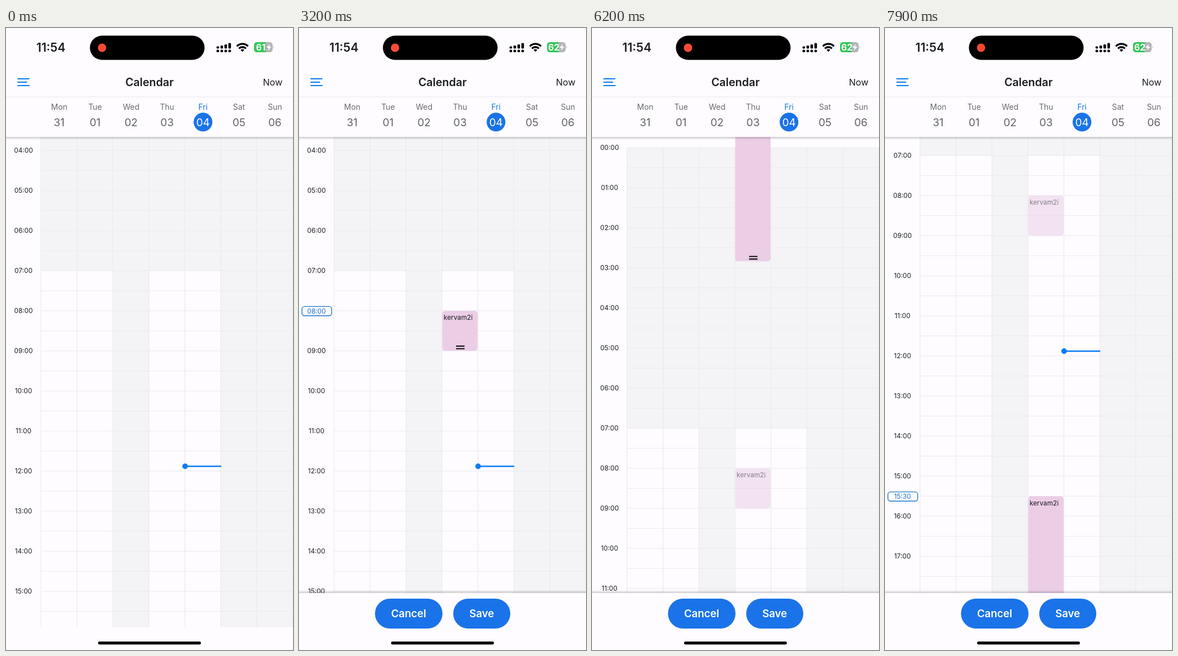
An HTML page that plays this animation: 508x1102 px, repeating every 8000 ms.

```html
<!DOCTYPE html>
<html lang="en">
<head>
<meta charset="utf-8">
<title>Calendar</title>
<style>
html, body { margin: 0; width: 100%; height: 100%; overflow: hidden; background: #fefcff; }
svg { display: block; width: 508px; height: 1102px; font-family: Inter, sans-serif; }
text { text-anchor: middle; fill: #1b1b1e; }
.bg { fill: #fefcff; }
.off { fill: #f4f3f6; }
.grid { stroke: #ebeaee; stroke-width: 1.2; }
.small { font-size: 11.8px; }
.event text { text-anchor: start; }
.event rect { fill: #ebcde6; }
.button rect { fill: #1a73e8; }
.button text { fill: #fff; font-size: 18.5px; font-weight: 600; }
</style>
</head>
<body>
<svg viewBox="0 0 508 1102">
  <defs>
    <linearGradient id="shade" x2="0" y2="1">
      <stop stop-color="#000" stop-opacity=".2"/>
      <stop offset="1" stop-color="#000" stop-opacity="0"/>
    </linearGradient>
  </defs>
  <rect class="bg" width="508" height="1102"/>

  <g id="sheet">
    <g id="cells"></g>
    <g fill="#0a7cf5">
      <rect x="317" y="842.3" width="64" height="2.5"/>
      <circle cx="317" cy="843.5" r="4.9"/>
    </g>
    <rect id="preview" x="253" width="65" height="71" rx="4" fill="#1a73e8" fill-opacity=".1"/>
    <g id="ghost" class="event small" opacity=".55" transform="translate(0 568)">
      <rect x="253.5" width="62.5" height="71" rx="5"/>
      <text x="256" y="16">kervam2i</text>
    </g>
    <g id="event" class="event small">
      <rect id="body" x="253.5" width="62.5" rx="5"/>
      <text x="256" y="16">kervam2i</text>
      <path id="handle" d="M278 -8.4h15M278 -3.8h15" stroke="#151515" stroke-width="2.1"/>
    </g>
    <g id="badge" class="small">
      <rect class="bg" x="5.2" y="-7.6" width="52.6" height="16.4" rx="4.5" stroke="#2079c9" stroke-width="1.4"/>
      <text id="time" x="31" y="4.9" style="fill:#1a73c8"></text>
    </g>
  </g>

  <rect class="bg" y="1061.5" width="508" height="41"/>
  <g id="bar">
    <rect y="-1001" x="-508" width="508" height="5" fill="url(#shade)" transform="rotate(180) translate(0 1001)" />
    <rect class="bg" width="508" height="101"/>
    <g class="button">
      <rect x="134.5" y="10" width="119.5" height="53" rx="26.5"/>
      <text x="194" y="43">Cancel</text>
      <rect x="273" y="10" width="101" height="53" rx="26.5"/>
      <text x="323.3" y="43">Save</text>
    </g>
  </g>
  <rect x="163" y="1087" width="182" height="5.2" rx="2.6"/>

  <rect y="193" width="508" height="5" fill="url(#shade)"/>
  <rect class="bg" width="508" height="193"/>
  <path class="grid" d="M0 122h508"/>
  <path d="M21 90h19.5M21 96h15.5M21 102h20" stroke="#0a7cf5" stroke-width="2.1" stroke-linecap="round"/>
  <text x="254" y="103" font-size="19.6" font-weight="600">Calendar</text>
  <text x="472" y="101.5" font-size="16">Now</text>
  <g id="days"></g>

  <text x="79.5" y="42" font-size="21" font-weight="600">11:54</text>
  <rect x="148.5" y="13.5" width="203" height="43" rx="21.5"/>
  <circle id="dot" cx="170" cy="35" r="7.4" fill="#ff4b37"/>
  <g id="signal"></g>
  <g fill="none" stroke="#000" stroke-width="3.3">
    <path d="M408.6 32.3a14 14 0 0 1 19.8 0M412.3 36.3a8.8 8.8 0 0 1 12.4 0"/>
    <path d="M418.5 42.3l-3.2-3.4a4.5 4.5 0 0 1 6.4 0z" fill="#000" stroke="none"/>
  </g>
  <rect x="439" y="25" width="33" height="18" rx="5.5" fill="#b4b4b9"/>
  <path d="M459.5 25v18h-15a5.5 5.5 0 0 1-5.5-5.5v-7a5.5 5.5 0 0 1 5.5-5.5z" fill="#34c759"/>
  <path d="M473.3 31.2q2 2.8 0 5.6z" fill="#b4b4b9"/>
  <text id="charge" x="451" y="39.8" font-size="15.8" font-weight="700" style="fill:#fff"></text>
  <path d="M467.3 28l-6.3 7h4l-1.4 5.3 6.2-7.2h-4z" fill="#fff"/>
</svg>
<script>
const $ = id => document.getElementById(id);
const HOUR = 71, STEP = HOUR / 6, COL = 63.65, LEFT = 62;
const pad = n => String(n).padStart(2, '0');
const colX = i => LEFT + i * COL;

// Static parts
let cells = `<rect class="off" x="${LEFT}" width="446" height="${7 * HOUR}"/>`;
for (const d of [2, 5, 6])
  cells += `<rect class="off" x="${colX(d)}" width="${COL}" height="${24 * HOUR}"/>`;
for (let i = 0; i <= 48; i++)
  cells += `<path class="grid" d="M${LEFT} ${i * HOUR / 2}H508"/>`;
for (let i = 0; i <= 7; i++)
  cells += `<path class="grid" d="M${colX(i)} 0V${24 * HOUR}"/>`;
for (let h = 0; h <= 24; h++)
  cells += `<text class="small" x="31" y="${h * HOUR + 4.2}">${pad(h)}:00</text>`;
$('cells').innerHTML = cells;

$('days').innerHTML = ['Mon', 'Tue', 'Wed', 'Thu', 'Fri', 'Sat', 'Sun'].map((name, i) => {
  const x = colX(i) + COL / 2 + .3, today = i === 4;
  return `<text x="${x}" y="144.8" font-size="13.8" style="fill:${today ? '#1a78e6' : '#6a696e'}">${name}</text>` +
    (today ? `<circle cx="${x}" cy="166.7" r="16.6" fill="#1a73e8"/>` : '') +
    `<text x="${x}" y="173.5" font-size="18.8" style="fill:${today ? '#fff' : '#626166'}">${pad(i ? i : 31)}</text>`;
}).join('');

$('signal').innerHTML = [4, 5.5, 7.5, 10].map((h, i) => {
  const x = 372.6 + i * 7;
  return `<rect x="${x}" y="${36.4 - h}" width="4.6" height="${h}" rx="1.6"/>` +
    `<rect x="${x}" y="38.4" width="4.6" height="4.6" rx="1.8"/>`;
}).join('');

// Motion: [ms, value] points joined by straight lines
function track(points, t) {
  let [t0, v0] = points[0];
  for (const [t1, v1] of points) {
    if (t < t1) return t <= t0 ? v0 : v0 + (v1 - v0) * (t - t0) / (t1 - t0);
    [t0, v0] = [t1, v1];
  }
  return v0;
}
const scroll = [[5410, -67], [5990, 212], [6980, 212], [7900, -271]];
const finger = [[900, 548.5], [1500, 501], [4700, 501], [5400, 130], [6350, 130],
                [6780, 756], [6900, 768], [7050, 829]];
const length = [[3400, 6], [4200, 24]];
const barTop = [[2700, 1102], [3000, 1001]];

const show = (id, on) => $(id).style.display = on ? '' : 'none';
const move = (id, y) => $(id).setAttribute('transform', `translate(0 ${y})`);

function draw(t) {
  const s = track(scroll, t);
  const slot = ms => Math.round((track(finger, ms) - s) / STEP);
  const top = slot(t) * STEP, tall = Math.round(track(length, t)) * STEP;
  const label = Math.max(0, slot(t - 120));
  const created = t >= 2500;

  move('sheet', s);
  show('preview', t >= 600 && !created);
  $('preview').setAttribute('y', top);
  show('ghost', t >= 4700);
  show('event', created);
  move('event', top);
  $('body').setAttribute('height', tall);
  move('handle', tall);
  show('badge', t >= 600);
  move('badge', top);
  $('time').textContent = pad(Math.floor(label / 6)) + ':' + pad(label % 6 * 10);

  show('bar', t > 2700);
  move('bar', track(barTop, t));
  $('charge').textContent = t < 500 ? 61 : 62;
  $('dot').setAttribute('opacity', .9 + .11 * Math.cos((t - 130) / 1500 * 2 * Math.PI));
}

function frame(now) {
  draw(Math.floor(now % 8000 / 100) * 100);
  requestAnimationFrame(frame);
}
draw(0);
requestAnimationFrame(frame);
</script>
</body>
</html>
```
